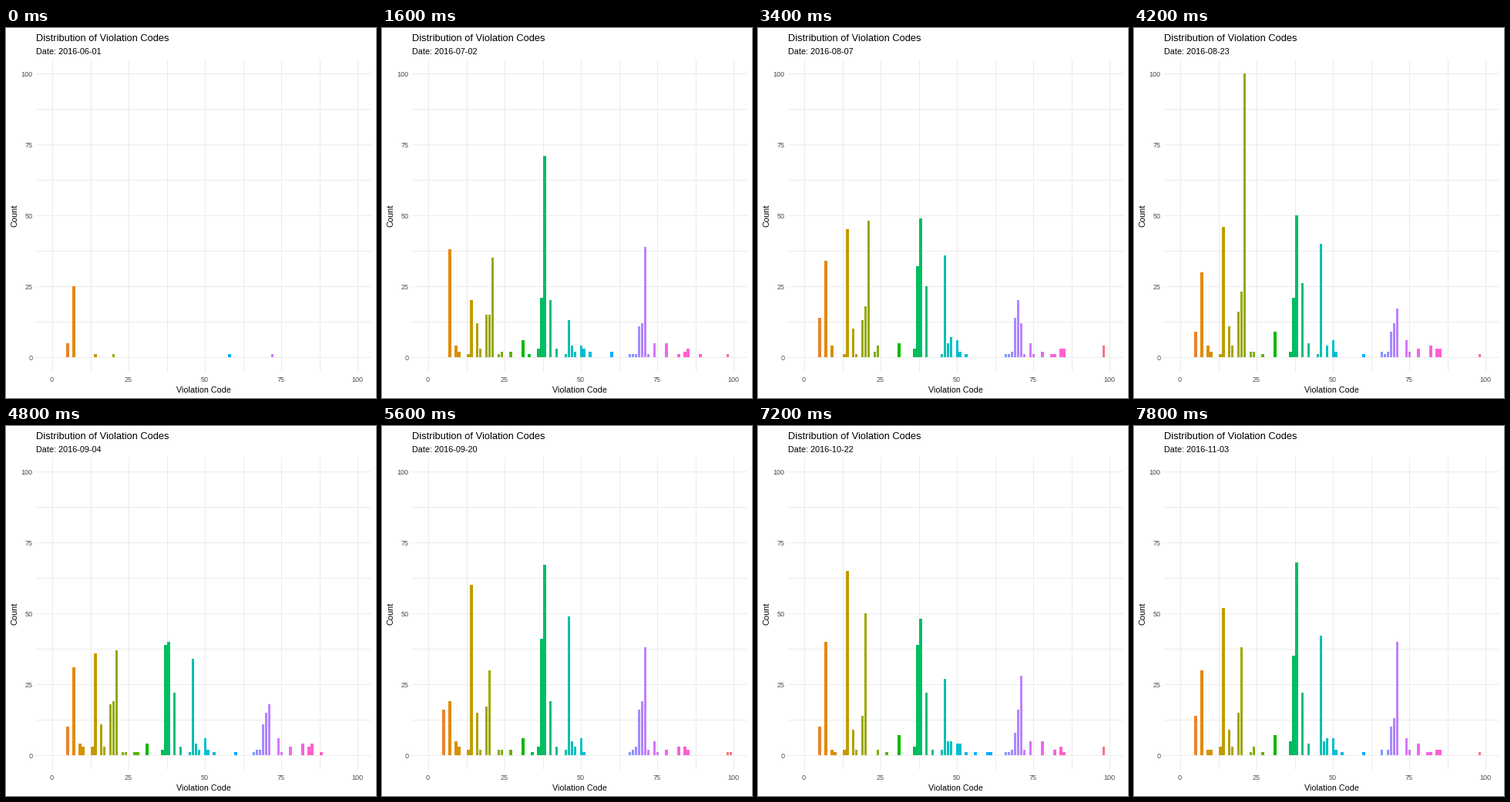
Animation of 480 by 480 pixels, one loop 8000 ms. Source, as a matplotlib script:

```python
import numpy as np
import matplotlib.pyplot as plt
from matplotlib.animation import FuncAnimation
from matplotlib.patches import Rectangle

SIZE, DPI = 480, 96
STEPS, INTERVAL = 40, 200
X0, DX = 60.3, 3.96         # pixel of code 0, pixels per code
Y0, DY = 427.05, 3.68       # pixel of count 0, pixels per count
LEFT, RIGHT, TOP, BOTTOM = 39, 474, 41, 446
START = np.datetime64("2016-06-01")

plt.rcParams["font.family"] = "Liberation Sans"

# Levels of the leading codes at a few key steps
KEYS = [0, 8, 14, 21, 28, 32, 39]
MAJOR = {
    5: [5, 0, 15, 9, 16, 25, 14],
    7: [25, 38, 29, 30, 19, 28, 30],
    14: [1, 20, 43, 46, 60, 39, 52],
    20: [1, 15, 22, 23, 30, 32, 38],
    21: [0, 35, 0, 100, 0, 0, 0],
    37: [0, 21, 42, 21, 41, 54, 35],
    38: [0, 71, 37, 50, 67, 70, 68],
    46: [0, 13, 31, 40, 49, 38, 42],
    71: [0, 39, 20, 17, 38, 35, 40],
}
# Mean daily count of the other codes
MINOR = {
    1: [23, 27, 45, 53, 60, 66, 67, 72, 75],
    2: [10, 13, 68, 82, 98],
    3: [9, 17, 24, 36, 42, 51, 78, 84, 85],
    5: [47, 48, 50, 74],
    7: [31],
    11: [16, 69],
    14: [19, 70],
    24: [40],
}


def day_of(step):
    return (STEPS * 4 - 5) * step // (STEPS - 1)


def counts_at(step):
    rng = np.random.default_rng(step)
    counts = np.zeros(100)
    activity = min(1, step / 3)
    for mean, codes in MINOR.items():
        counts[codes] = activity * rng.binomial(2 * mean, 0.5, len(codes))
    counts[rng.integers(1, 100, 2)] += 1

    # Leading codes follow their levels and wander between key steps
    t = np.interp(step, KEYS, range(len(KEYS))) % 1
    wander = 2 * t * (1 - t)
    for code, levels in MAJOR.items():
        counts[code] = np.interp(step, KEYS, levels) * rng.uniform(1 - wander, 1 + wander)
    return np.minimum(np.rint(counts), 100)


def hcl(h, c=100, lum=65):
    """Polar LUV to sRGB."""
    un, vn = 0.19784, 0.46834
    y = ((lum + 16) / 116) ** 3
    u = c * np.cos(np.radians(h)) / (13 * lum) + un
    v = c * np.sin(np.radians(h)) / (13 * lum) + vn
    x = 9 * y * u / (4 * v)
    z = y * (12 - 3 * u - 20 * v) / (4 * v)
    rgb = np.array([[3.2405, -1.5371, -0.4985],
                    [-0.9693, 1.8760, 0.0416],
                    [0.0556, -0.2040, 1.0572]]) @ [x, y, z]
    rgb = np.clip(rgb, 0, 1)
    return np.where(rgb > 0.00304, 1.055 * rgb ** (1 / 2.4) - 0.055, 12.92 * rgb)


def code_color(code):
    # Evenly spaced hues over 80 levels; some codes are unused
    level = np.interp(code, [1, 7, 20, 31, 38, 46, 60, 71, 85, 99],
                      [0, 6, 17, 25, 30, 38, 49, 59, 70, 79])
    return hcl(15 + 360 * level / 80)


def px(v):
    return int(np.floor(v + 0.5))


fig = plt.figure(figsize=(SIZE / DPI, SIZE / DPI), dpi=DPI, facecolor="white")
ax = fig.add_axes([0, 0, 1, 1])
ax.set_xlim(0, SIZE)
ax.set_ylim(SIZE, 0)
ax.axis("off")


def box(x, y, w, h, color):
    return ax.add_patch(Rectangle((x, y), w, h, fc=color, lw=0, antialiased=False))


def label(x, y, s, size, color="black", **kw):
    return ax.text(x, y, s, fontsize=size * 72 / DPI, color=color, **kw)


for i in range(9):
    v = 12.5 * i
    gx, gy = px(X0 + DX * v), px(Y0 - DY * v)
    box(gx, TOP, 1, BOTTOM - TOP, "#EBEBEB")
    box(LEFT, gy, RIGHT - LEFT, 1, "#EBEBEB")
    if i % 2 == 0:
        label(gx - 0.5, 459, f"{v:.0f}", 9, "#4D4D4D", ha="center")
        label(34.5, gy + 4, f"{v:.0f}", 9, "#4D4D4D", ha="right")

label(39, 17, "Distribution of Violation Codes", 12.9)
date = label(39, 34, "", 10.85)
label(256, 473, "Violation Code", 10.8, ha="center")
label(17, 243, "Count", 11, rotation=90, ha="right", va="center")

bars = []
for code in range(100):
    mid = X0 + DX * code
    x1, x2 = px(mid - 0.45 * DX), px(mid + 0.45 * DX)
    bars.append(box(x1, px(Y0), x2 - x1, 0, code_color(code)))


def draw(step):
    date.set_text(f"Date: {START + day_of(step)}")
    for bar, n in zip(bars, counts_at(step)):
        top = px(Y0 - DY * n)
        bar.set_y(top)
        bar.set_height(px(Y0) - top)
        bar.set_visible(n > 0)
    return [date, *bars]


anim = FuncAnimation(fig, draw, frames=STEPS, interval=INTERVAL,
                     repeat=True, repeat_delay=0, blit=False)
plt.show()
```
